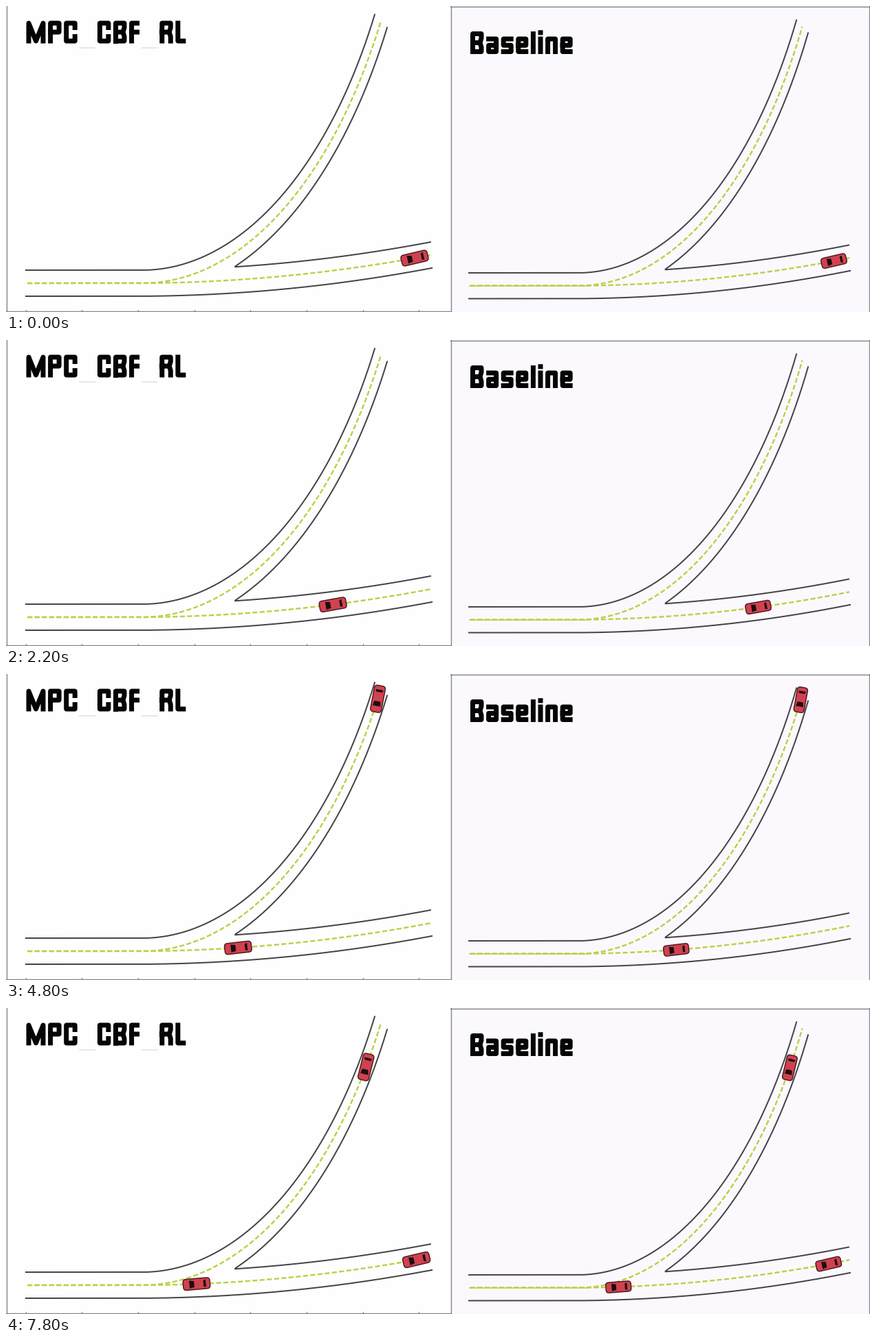
Animation of 1256x446 px, one loop 8000 ms. Source, as a matplotlib script:

```python
import numpy as np
import matplotlib.pyplot as plt
from matplotlib.animation import FuncAnimation
from matplotlib.patches import FancyBboxPatch, Polygon, Rectangle
from matplotlib.transforms import Affine2D

W, H, DPI = 1256, 446, 100
STEP, FRAMES = 200, 40
PX = 72 / DPI

INK, DASH, EDGE, TYPE = "#444446", "#bcd044", "#86868a", "#050505"
GLASS = "#1a0e11"

fig = plt.figure(figsize=(W / DPI, H / DPI), dpi=DPI)
ax = fig.add_axes([0, 0, 1, 1])
ax.set_xlim(0, W)
ax.set_ylim(H, 0)
ax.axis("off")


def line(xs, ys, color=INK, width=2.0, **kw):
    ax.plot(xs, ys, color=color, lw=width * PX, **kw)


def rect(x, y, w, h, color):
    ax.add_patch(Rectangle((x, y), w, h, fc=color, ec="none", zorder=0))


class Branch:
    """Circular arm of the road, seen through unequal axis scales."""

    ROAD_Y, HALF_X, HALF_Y = 404, 10.4, 19

    def __init__(self, bend, end, turn):
        self.bend, self.turn = bend, turn
        self.a = (end[0] - bend) / np.sin(turn)
        self.b = (self.ROAD_Y - end[1]) / (1 - np.cos(turn))

    def at(self, th, side=0):
        """Point at angle th; side is 1 above, 0 centre, -1 below."""
        return (self.bend + (self.a - side * self.HALF_X) * np.sin(th),
                self.ROAD_Y - self.b
                + (self.b - side * self.HALF_Y) * np.cos(th))

    def curve(self, side):
        return self.at(np.linspace(0, self.turn, 500), side)

    def with_lead(self, side, start):
        x, y = self.curve(side)
        return np.r_[start, x], np.r_[y[0], y]

    def angle_at_x(self, x):
        return np.arcsin((x - self.bend) / self.a)

    def angle_at_y(self, y):
        return np.arccos(1 - (self.ROAD_Y - y) / self.b)

    def tilt(self, th):
        return np.degrees(np.arctan2(self.b * np.sin(th),
                                     self.a * np.cos(th)))


RAMP = Branch(198, (545, 22), np.radians(60))
MAIN = Branch(186, (618, 363), np.radians(5.9))
TIP_X = 333


class Panel:
    def __init__(self, kx, ox, ky, oy):
        self.kx, self.ox, self.ky, self.oy = kx, ox, ky, oy

    def out(self, x, y):
        return self.kx * x + self.ox, self.ky * y + self.oy

    def road(self):
        line(*self.out(*RAMP.with_lead(1, 29)), zorder=3)
        line(*self.out(*MAIN.with_lead(-1, 29)), zorder=3)
        rx, ry = RAMP.curve(-1)
        mx, my = MAIN.curve(1)
        r, m = rx >= TIP_X, mx >= TIP_X
        line(*self.out(np.r_[rx[r][::-1], mx[m]], np.r_[ry[r][::-1], my[m]]),
             zorder=3)
        for branch in (RAMP, MAIN):
            line(*self.out(*branch.with_lead(0, 31)), DASH, 2.4,
                 dashes=(3, 1.4), dash_capstyle="butt", zorder=2)

    def pose(self, branch, v):
        """Stage position and tilt; v is stage x on MAIN, stage y on RAMP."""
        if branch is MAIN:
            th = branch.angle_at_x((v - self.ox) / self.kx)
        else:
            th = branch.angle_at_y((v - self.oy) / self.ky)
        x, y = self.out(*branch.at(th))
        return x, y, 1.06 * branch.tilt(th) + 2.5


LEFT = Panel(1, 0, 1, 0)
RIGHT = Panel(0.939, 673 - 0.939 * 29, 0.989, 8.2)


class Car:
    """Red car seen from above, its nose towards local -x.

    It enters at time `enter`, cruises, then brakes evenly to a stop.
    """

    def __init__(self, panel, branch, enter, start, speed, brake=9, stop=20):
        self.panel, self.branch = panel, branch
        self.enter, self.start, self.speed = enter, start, speed
        self.brake, self.stop = brake, stop
        self.parts = [FancyBboxPatch(
            (-19.5, -8), 39, 16, boxstyle="round,pad=0,rounding_size=4.5",
            fc="#d2414f", ec="#4e1b22", lw=1.5 * PX)]
        self.window(-10.5, -3.5, 5.8, 4.4)
        self.window(10, 13.5, 4.4, 5.6)
        for p in self.parts:
            p.set_zorder(6)
            ax.add_patch(p)

    def window(self, x0, x1, h0, h1):
        self.parts.append(Polygon([(x0, -h0), (x1, -h1), (x1, h1), (x0, h0)],
                                  fc=GLASS, ec="none"))

    def travel(self, t):
        t = min(t, self.stop)
        late = max(0, t - self.brake)
        return self.speed * (t - late ** 2 / (2 * (self.stop - self.brake)))

    def update(self, now):
        t = now - self.enter
        shown = t > -1e-6
        x, y, tilt = self.panel.pose(self.branch,
                                     self.start + self.travel(max(t, 0)))
        place = (Affine2D().scale(self.panel.kx).rotate_deg(-tilt)
                 .translate(x, y) + ax.transData)
        for p in self.parts:
            p.set_visible(shown)
            p.set_transform(place)


# Heavy letters as strokes on a grid: column a, m, c or b, then row from 0 up.
STROKES = {
    "M": "a0 a4 m0 b4 b0",
    "P": "a0 a4 b4 b2 a2",
    "C": "b3 b4 a4 a0 b0 b1",
    "B": "a0 a4 b4 b3 c2 b1 b0 a0|a2 c2",
    "F": "a0 a4 b4|a2 b2",
    "R": "a0 a4 b4 b3 c2 a2|c2 b1 b0",
    "L": "a4 a0 b0",
    "a": "a4 b4 b0 a0 a2 b2",
    "s": "b4 a4 a2 b2 b0 a0",
    "e": "b0 a0 a4 b4 b2 a2",
    "l": "a0 a4",
    "i": "a0 a4|a6 a6",
    "n": "a0 a4 b4 b0",
}
STEM, GAP, CAP, LOW = 7, 3.6, 33, 25.5


def letter_width(ch):
    if ch in "li":
        return STEM
    if ch in "FL":
        return 15
    return 28 if ch == "M" else 18 if ch.islower() else 19.5


def title(text, x, base):
    for ch in text:
        if ch == "_":
            rect(x - 1, base + 5.5, 24, 2, "#e7e7e9")
            x += 22 + GAP
            continue
        w = letter_width(ch)
        left, right = x + STEM / 2, x + w - STEM / 2
        cols = {"a": left, "b": right, "m": (left + right) / 2, "c": right - 2}
        tall = LOW if ch.islower() and ch != "l" else CAP
        for stroke in STROKES[ch].split("|"):
            pts = stroke.split()
            xs = [cols[p[0]] for p in pts]
            ys = [base - STEM / 2 - (tall - STEM) * int(p[1]) / 4 for p in pts]
            # The tiny rise keeps the dot from having zero length.
            line(xs, ys + np.linspace(0, 0.05, len(ys)), TYPE, STEM,
                 solid_capstyle="projecting", solid_joinstyle="round",
                 snap=False, zorder=4)
        x += w + GAP


rect(0, 0, 646, H, "#fefefe")
rect(646, 0, W - 646, H, "#fbf9fd")
for x in (1, 646.5, 1254.5):
    line([x, x], [0, H], EDGE, 1.4)
line([0, 646], [444.5, 444.5], EDGE, 1.4)
line([646, W], [1, 1], EDGE, 1.4)
for x in 28.5 + 81.7 * np.arange(8):
    line([x, x], [442.5, H], EDGE, 1.2)

LEFT.road()
RIGHT.road()
line([674, 845], [407.7, 407.7], DASH, 1.6, zorder=2)
title("MPC_CBF_RL", 29.5, 54.5)
title("Baseline", 675, 70)

cars = [
    Car(LEFT, MAIN, 0, 594, -54, 4.24, 7.5),
    Car(RIGHT, MAIN, 0, 1203.5, -50, 3, 10.5),
    Car(LEFT, RAMP, 4.4, 25, 28, 1.3, 3.06),
    Car(RIGHT, RAMP, 4.4, 30, 19, 1.4, 6.4),
    Car(LEFT, MAIN, 7, 611, -18),
    Car(RIGHT, MAIN, 7, 1215, -24),
]


def draw(i):
    for car in cars:
        car.update(i * STEP / 1000)
    return [p for car in cars for p in car.parts]


anim = FuncAnimation(fig, draw, frames=FRAMES, interval=STEP,
                     init_func=lambda: draw(0), repeat=True, repeat_delay=0,
                     blit=False)
plt.show()
```
